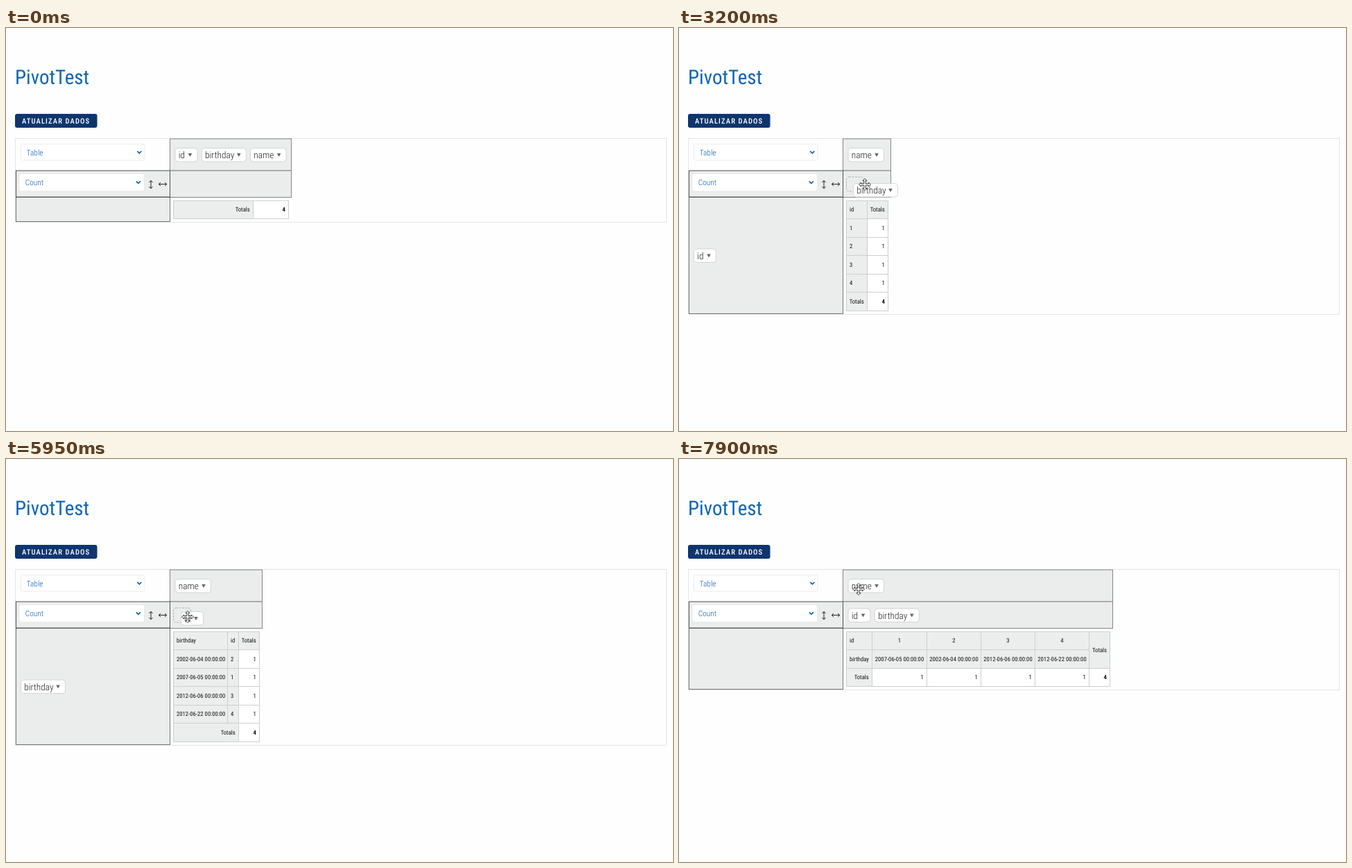
Write an HTML page that moves like this. It is 962 px wide and 582 px high and loops after 8000 ms.

```html
<!DOCTYPE html>
<html lang="pt">
<head>
<meta charset="utf-8">
<title>PivotTest</title>
<style>
html, body { margin: 0; width: 100%; height: 100%; overflow: hidden; background: #fefefe; }
svg { display: block; position: absolute; left: 0; top: 0; }
text { font-family: "Roboto Condensed", Roboto, "Liberation Sans", sans-serif; font-stretch: 75%;
  font-size: 8.7px; fill: #111; text-rendering: geometricPrecision; white-space: pre; }
.title { font-size: 29px; fill: #0f66b4; }
.button { font-size: 10.6px; font-weight: 500; letter-spacing: 1.12px; fill: #fff; }
.select { font-size: 11.4px; font-weight: 300; fill: #0d5fb0; }
.chip { font-size: 13.4px; font-weight: 300; fill: #222; }
.v { fill: #808684; }
.g { font-weight: 700; }
.R { text-anchor: end; }
.M { text-anchor: middle; }
</style>
</head>
<body>
<svg width="962" height="582" viewBox="0 0 962 582">
  <g id="scene"></g>
  <g id="page"></g>
  <g id="drag"></g>
  <g id="pointer"></g>
</svg>
<script>
const $ = id => document.getElementById(id);
const LOOP = 8000, STEP = 50;
const GREY = '#ebedec';
const WIDTH = { id: 32, birthday: 64, name: 51.5 };
const ARROW = 'M0 0V11.5L2.7 9.1 4.5 13.2 6.4 12.4 4.7 8.4H8.2Z';
const MOVE = 'M0-8.5L3-5.5H1.2V-1.2H5.5V-3L8.5 0 5.5 3V1.2H1.2V5.5H3L0 8.5-3 5.5H-1.2V1.2H-5.5V3L-8.5 0-5.5-3V-1.2H-1.2V-5.5H-3Z';
const DATES = ['2002-06-04', '2007-06-05', '2012-06-06', '2012-06-22'].map(d => d + ' 00:00:00');
const OWNER = [2, 1, 3, 4]; // id that belongs to each date

let squeeze = 1;
const text = (x, y, s, cls) =>
  `<text class="${cls}" transform="translate(${x} ${y}) scale(${squeeze} 1)">${s}</text>`;
const box = (x, y, r, b, fill, stroke = 'none', rx = 0, more = '') =>
  `<rect x="${x}" y="${y}" width="${r - x}" height="${b - y}" rx="${rx}" fill="${fill}" stroke="${stroke}" ${more}/>`;
const line = (d, color, w = 1) =>
  `<path d="${d}" fill="none" stroke="${color}" stroke-width="${w}"/>`;

// Condense by a fixed factor only where no condensed face exists
function findSqueeze() {
  const page = $('page');
  page.innerHTML = text(0, 0, 'PivotTest', 'title');
  const el = page.firstChild, narrow = el.getComputedTextLength();
  el.style.fontFamily = 'Roboto, "Liberation Sans", sans-serif';
  el.style.fontStretch = '100%';
  if (narrow > el.getComputedTextLength() * .95) squeeze = .88;
}

function chip(name, x, y) {
  const w = WIDTH[name], r = x + w - 10.5;
  return box(x, y, x + w, y + 19.5, '#fff', '#d2d4d4', 4) +
    text(x + 4.7, y + 14.6, name, 'chip') +
    `<path d="M${r - 2.8} ${y + 7.6}h5.6l-2.8 5z" fill="#666"/>`;
}
const slot = (x, y) => box(x, y, x + 25, y + 21, 'none', '#aaa', 4, 'stroke-dasharray="2.5 1.8"');

// Cells: first column, last column, first row, last row, kind, text
// Kinds: L left, M middle and R right headers; v value, t total, g grand total
const rowY = i => Math.round(249 + 26.45 * i) + .5;
function table(xs, cells) {
  return cells.map(([a, b, r, s, kind, label = '']) => {
    const x0 = xs[a] + .5, x1 = xs[b] + .5, y0 = rowY(r), y1 = rowY(s);
    const head = 'LMR'.includes(kind);
    const align = head ? kind : 'R';
    const x = align === 'L' ? x0 + 4.5 : align === 'M' ? (x0 + x1) / 2 : x1 - 4.7;
    return box(x0, y0, x1, y1, head ? '#ebeeed' : '#fff', '#ccd0cf') +
      (label === '' ? '' : text(x, (y0 + y1) / 2 + 2.7, label, kind + ' ' + align));
  }).join('');
}

const four = fn => [0, 1, 2, 3].flatMap(fn);
const noneCells = [[0, 1, 0, 1, 'R', 'Totals'], [1, 2, 0, 1, 'g', 4]];
const idCells = [
  [0, 1, 0, 1, 'L', 'id'], [1, 2, 0, 1, 'R', 'Totals'],
  ...four(i => [[0, 1, i + 1, i + 2, 'L', i + 1], [1, 2, i + 1, i + 2, 't', 1]]),
  [0, 1, 5, 6, 'R', 'Totals'], [1, 2, 5, 6, 'g', 4]];
const cross = (rowName, colName, rows, cols, hit) => [
  [0, 1, 0, 1, 'L'], [1, 2, 0, 1, 'L', colName],
  [0, 1, 1, 2, 'L', rowName], [1, 2, 1, 2, 'L'],
  ...four(c => [[c + 2, c + 3, 0, 2, 'M', cols[c]]]),
  [6, 7, 0, 2, 'M', 'Totals'],
  ...four(r => [[0, 2, r + 2, r + 3, 'L', rows[r]],
    ...four(c => [[c + 2, c + 3, r + 2, r + 3, 'v', hit(r, c) ? 1 : '']]),
    [6, 7, r + 2, r + 3, 't', 1]]),
  [0, 2, 6, 7, 'R', 'Totals'],
  ...four(c => [[c + 2, c + 3, 6, 7, 't', 1]]),
  [6, 7, 6, 7, 'g', 4]];
const ids = [1, 2, 3, 4];
const tables = {
  none: [[241, 356, 407], 1, noneCells],
  noneSmall: [[241, 329, 369], 1, noneCells],
  byId: [[241, 305, 368], 6, idCells],
  byIdSmall: [[241, 271, 301], 6, idCells],
  idBirthday: [[241, 257, 293, 371, 450, 528, 606, 636], 7,
    cross('id', 'birthday', ids, DATES, (r, c) => OWNER[c] === r + 1)],
  rowsBoth: [[241, 319, 335, 365], 6, [
    [0, 1, 0, 1, 'L', 'birthday'], [1, 2, 0, 1, 'L', 'id'], [2, 3, 0, 1, 'R', 'Totals'],
    ...four(i => [[0, 1, i + 1, i + 2, 'L', DATES[i]], [1, 2, i + 1, i + 2, 'L', OWNER[i]],
      [2, 3, i + 1, i + 2, 't', 1]]),
    [0, 2, 5, 6, 'R', 'Totals'], [2, 3, 5, 6, 'g', 4]]],
  birthdayId: [[241, 297, 319, 333, 346, 360, 373, 403], 7,
    cross('birthday', 'id', DATES, ids, (r, c) => OWNER[r] === c + 1)],
  colsBoth: [[241, 278, 357, 435, 513, 591, 621], 3, [
    [0, 1, 0, 1, 'L', 'id'], [0, 1, 1, 2, 'L', 'birthday'], [0, 1, 2, 3, 'R', 'Totals'],
    ...four(i => [[i + 1, i + 2, 0, 1, 'M', i + 1],
      [i + 1, i + 2, 1, 2, 'M', DATES[OWNER[i] - 1]], [i + 1, i + 2, 2, 3, 't', 1]]),
    [5, 6, 0, 2, 'M', 'Totals'], [5, 6, 2, 3, 'g', 4]]]
};

// Start, table, unused chips, column chips, row chips, dragged chip; "_" is the drop slot
const scenes = [
  [0, 'none', 'id birthday name', '', ''],
  [950, 'none', '_ birthday name', '', '', 'id'],
  [1100, 'noneSmall', 'birthday name', '', '_', 'id'],
  [1800, 'byId', 'birthday name', '', 'id'],
  [2750, 'byId', '_ name', '', 'id', 'birthday'],
  [2950, 'byIdSmall', 'name', '_', 'id', 'birthday'],
  [3450, 'idBirthday', 'name', 'birthday', 'id'],
  [4400, 'idBirthday', 'name', '_', 'id', 'birthday'],
  [4550, 'idBirthday', 'name', '', 'id', 'birthday'],
  [4750, 'idBirthday', 'name', '', '_ id', 'birthday'],
  [4850, 'rowsBoth', 'name', '', 'birthday id'],
  [5500, 'rowsBoth', 'name', '', 'birthday _', 'id'],
  [5750, 'rowsBoth', 'name', '_', 'birthday', 'id'],
  [6000, 'birthdayId', 'name', 'id', 'birthday'],
  [6950, 'birthdayId', 'name', 'id', '_', 'birthday'],
  [7300, 'birthdayId', 'name', 'id _', '', 'birthday'],
  [7600, 'colsBoth', 'name', 'id birthday', '']
];

// Time, x, y of the pointer
const path = [
  [50, 20, 0], [500, 330, 249], [650, 330, 249], [800, 257, 186], [950, 257, 186],
  [1450, 198, 270], [1800, 198, 270], [2600, 265, 180], [2750, 265, 180],
  [3200, 268, 226], [3900, 268, 226], [4100, 343, 230], [4300, 273, 219], [4400, 273, 219],
  [4700, 35, 337], [4850, 35, 337], [5250, 31, 354], [5500, 31, 350],
  [5950, 262, 228], [6100, 262, 228], [6350, 185, 300], [6450, 185, 300],
  [6650, 111, 358], [6750, 88, 380], [6900, 60, 342], [6950, 60, 342],
  [7250, 243, 236], [7400, 289, 230], [7600, 289, 230], [7900, 259, 188]
];
const GRIP = { id: [-10, -8], birthday: [-17, -2] };

let hits = [];
function put(name, x, y) {
  if (name === '_') return slot(x + .5, y - 10.5);
  hits.push([x + 3, y - 10, x + 3 + WIDTH[name], y + 11]);
  return chip(name, x + 3, y - 9.5);
}
const names = list => list ? list.split(' ') : [];
function across(list, y) {
  let x = 241;
  return names(list).map(n => {
    const s = put(n, x, y);
    x += n === '_' ? 33 : WIDTH[n] + 6.3;
    return s;
  }).join('');
}
function down(list, mid) {
  const all = names(list);
  return all.map((n, i) => put(n, 18.5, mid + (i - (all.length - 1) / 2) * 31)).join('');
}

function drawScene([, key, unused, cols, rows]) {
  const [xs, count, cells] = tables[key];
  const right = xs[xs.length - 1] + 4.5, end = rowY(count) + 4;
  hits = [];
  $('scene').innerHTML =
    box(13.5, 159.5, 952.5, end + 1, '#fefefe', '#e3e5e5') +
    box(236.5, 160, right, 206, GREY, '#858585') +
    box(236.5, 206, right, 244.5, GREY, '#858585') +
    box(14.5, 244.5, 236.5, end, GREY, '#747474') +
    box(14.5, 206, 236.5, 244, GREY, '#505050') +
    table(xs, cells) + across(unused, 183) + across(cols, 225.5) +
    down(rows, (244.5 + end) / 2);
}

function drawPage() {
  const chevron = (x, y) => line(`M${x - 3} ${y - 1.6}l3 3 3-3`, '#0b66b5', 1.7);
  $('page').innerHTML =
    text(13, 81, 'PivotTest', 'title') +
    box(13, 124, 131.5, 144, '#0f3570', 'none', 3) +
    text(23, 137.6, 'ATUALIZAR DADOS', 'button') +
    box(21.5, 167.5, 200, 191, '#fff', '#ebecec', 3) +
    text(29.7, 183.6, 'Table', 'select') + chevron(192.3, 179.5) +
    box(19.5, 211, 199, 235, '#fff', 'none', 3) +
    text(27.7, 227.4, 'Count', 'select') + chevron(190.8, 223) +
    line('M209 220.5V231.5M206.5 223l2.5-2.8 2.5 2.8M206.5 229l2.5 2.8 2.5-2.8', '#222') +
    line('M220.5 225.5H231.5M223 223l-2.8 2.5 2.8 2.5M229 223l2.8 2.5-2.8 2.5', '#222');
}

function pointerAt(t) {
  const i = path.findIndex(p => p[0] > t);
  if (i < 0) return path[path.length - 1].slice(1);
  const [t0, x0, y0] = path[i - 1], [t1, x1, y1] = path[i];
  const u = (t - t0) / (t1 - t0), e = u * u * (3 - 2 * u);
  return [Math.round(x0 + (x1 - x0) * e), Math.round(y0 + (y1 - y0) * e)];
}

let shown = null;
function draw(t) {
  const scene = scenes.filter(s => s[0] <= t).pop();
  if (scene !== shown) drawScene(shown = scene);
  const held = scene[5];
  if (t < path[0][0]) {
    $('pointer').innerHTML = $('drag').innerHTML = '';
    return;
  }
  const [x, y] = pointerAt(t);
  const over = held || hits.some(([l, top, r, b]) => x >= l && x <= r && y >= top && y <= b);
  $('drag').innerHTML = held ? chip(held, x + GRIP[held][0] + .5, y + GRIP[held][1] + .5) : '';
  $('pointer').innerHTML =
    `<path transform="translate(${x} ${y})" d="${over ? MOVE : ARROW}" fill="#fff" stroke="#222" stroke-width=".9"/>`;
}

findSqueeze();
drawPage();
const start = performance.now();
function tick() {
  const t = (performance.now() - start) % LOOP;
  draw(Math.floor(t / STEP) * STEP);
  requestAnimationFrame(tick);
}
draw(0);
requestAnimationFrame(tick);
</script>
</body>
</html>
```
